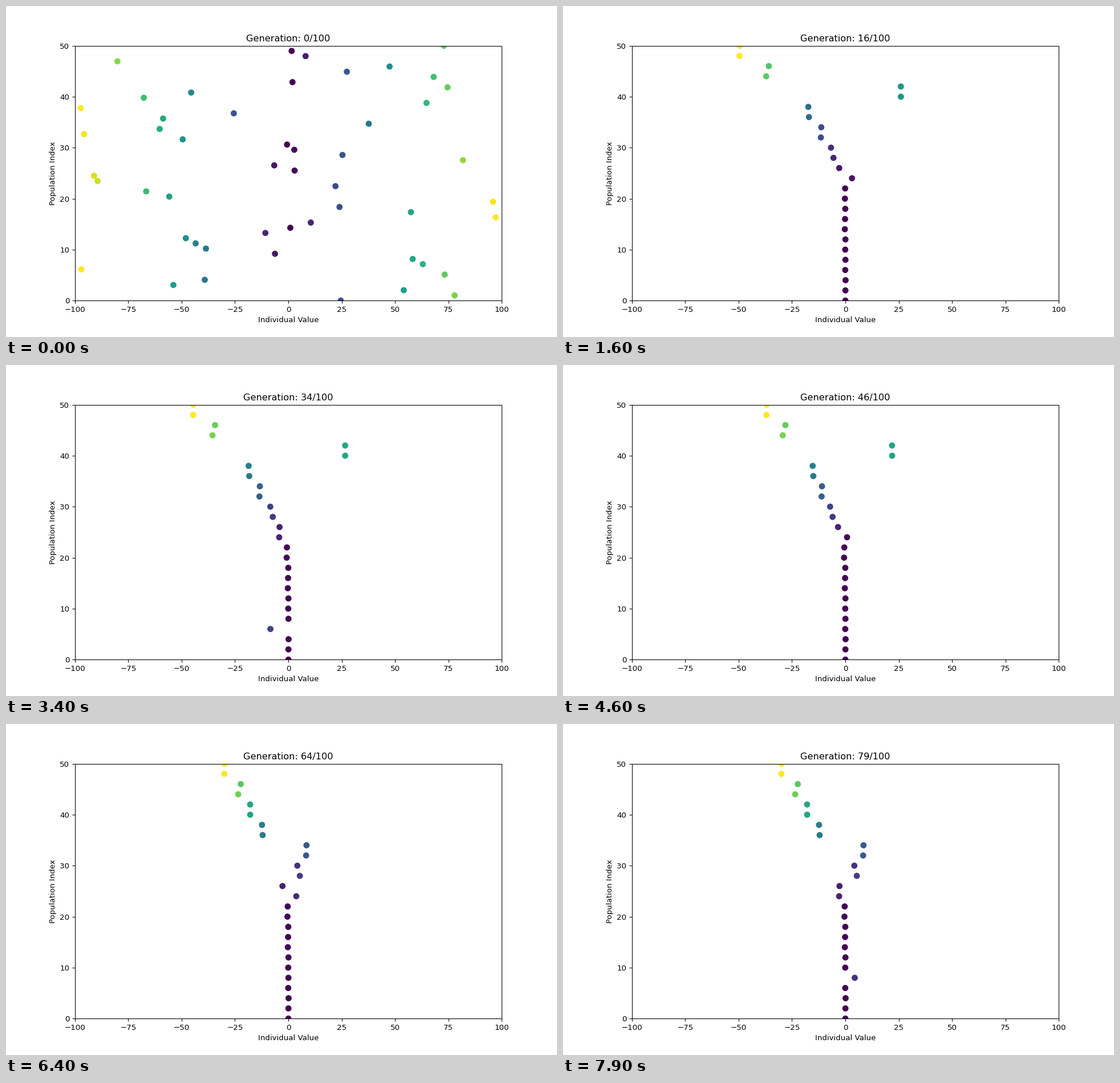
These frames come from a looping animation (966 by 580 pixels, 8 s). A matplotlib script:

```python
import numpy as np
import matplotlib.pyplot as plt
from matplotlib.animation import FuncAnimation

W, H, DPI = 966, 580, 96.6
FRAMES, PAIRS = 80, 13
LOW, HIGH = -100, 100

rng = np.random.default_rng(7)
start = rng.uniform(0.98 * LOW, 0.98 * HIGH, 50)
survivors = start[np.argsort(np.abs(start))][:2 * PAIRS]
phase = rng.integers(0, 4, PAIRS)
jitter = rng.normal(0, 0.03, 2 * PAIRS) * np.arange(2 * PAIRS)


def families(gen):
    """Value of each parent pair, fittest first: zero, then a widening tail."""
    worst = np.interp(gen, [9, 24, 34, 46, 64], [52.6, 46.4, 46.4, 38, 29.7])
    power = np.interp(gen, [9, 24], [2.6, 1.8])
    tail = np.clip((np.arange(PAIRS) - 4) / 8, 0, 1)
    # A few families sit on the other side of zero and swap halfway.
    side = np.where(gen < 50, 1, -1)
    sign = -np.ones(PAIRS)
    sign[10] = side[10]
    sign[7:9] = -side[7:9]
    return sign * worst * tail ** power


def population(gen):
    if gen == 0:
        return start
    # Each pair is replaced every fourth generation, at its own phase.
    step = gen + (phase - gen) % 4
    settled = np.clip((step - 1) / 8, 0, 1).repeat(2)
    goal = families(step).repeat(2) + jitter
    pop = survivors + (goal - survivors) * settled
    # One individual mutates.
    luck = np.random.default_rng(gen)
    pop[luck.integers(2, 22)] += luck.choice([-1, 1]) * luck.uniform(4, 9)
    return pop


fig, ax = plt.subplots(figsize=((W + 1e-6) / DPI, (H + 1e-6) / DPI), dpi=DPI)
ax.set(xlim=(LOW, HIGH), ylim=(0, 50),
       xlabel="Individual Value", ylabel="Population Index")
dots = ax.scatter(start, np.linspace(0, 50, len(start)), s=50,
                  c=np.abs(start), cmap="viridis")
title = ax.set_title("")


def draw(gen):
    pop = population(gen)
    size = np.abs(pop)
    dots.set_offsets(np.column_stack([pop, np.linspace(0, 50, len(pop))]))
    dots.set_array(size)
    dots.set_clim(size.min(), size.max())
    title.set_text(f"Generation: {gen}/100")
    return dots, title


anim = FuncAnimation(fig, draw, frames=FRAMES, interval=100, repeat=True)
plt.show()
```
